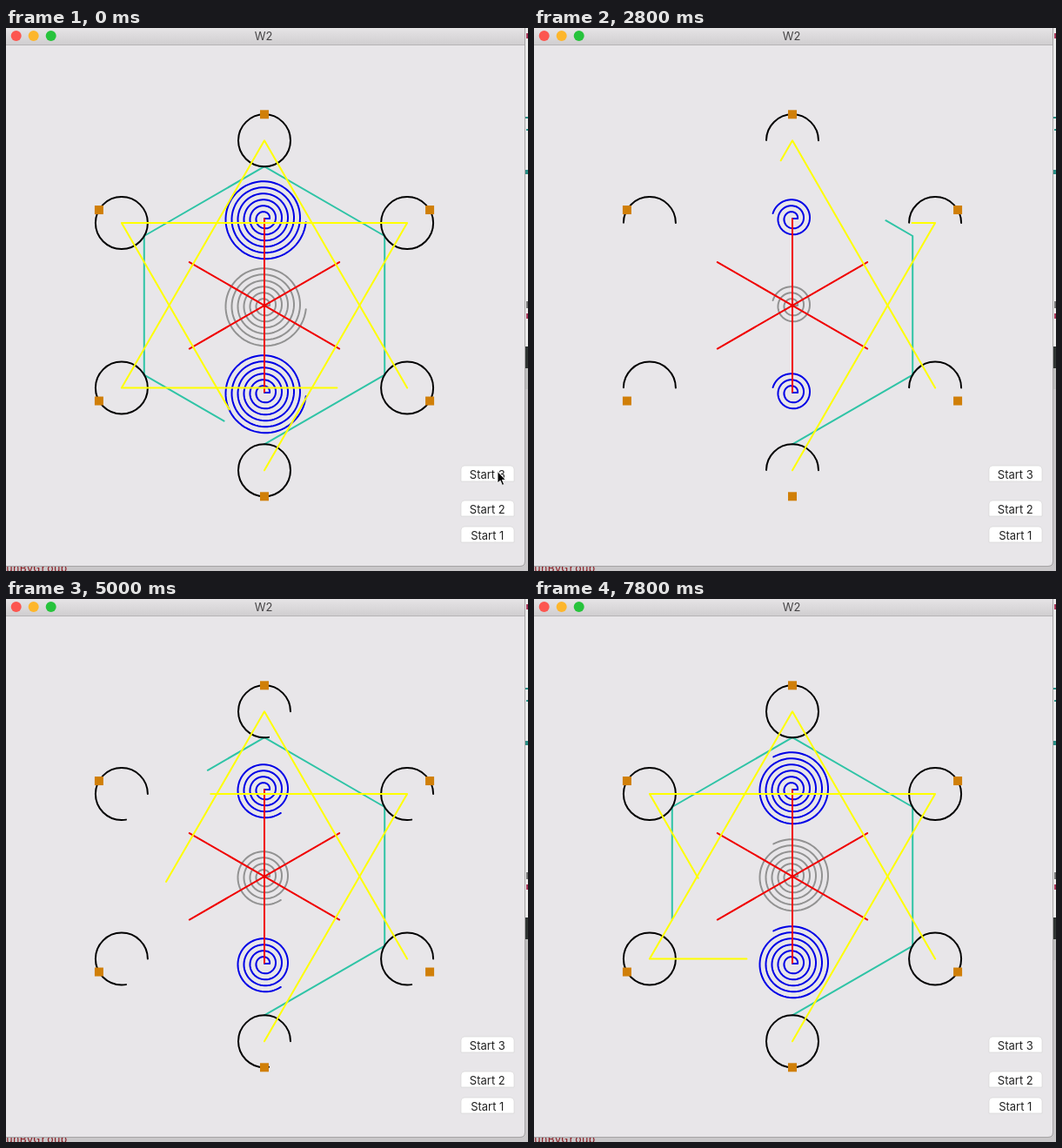
An HTML page for the animation above (8000 ms loop, 600 px wide and 624 px high).

```html
<!DOCTYPE html>
<html lang="en">
<head>
<meta charset="utf-8">
<title>W2</title>
<style>
  html, body { margin: 0; width: 100%; height: 100%; overflow: hidden; background: #c6c4c6; }
  svg { display: block; width: 600px; height: 624px; }
  text { font-family: Inter, Roboto, sans-serif; font-size: 13px; text-anchor: middle; }
  .code { font-family: "DejaVu Sans Mono", monospace; text-anchor: start; }
  #drawing { fill: none; stroke-width: 2; stroke-linecap: round; stroke-linejoin: round; }
</style>
</head>
<body>
<svg viewBox="0 0 600 624">
  <defs>
    <linearGradient id="bar" x2="0" y2="1">
      <stop stop-color="#e6e4e6"/><stop offset="1" stop-color="#cfcdcf"/>
    </linearGradient>
  </defs>

  <!-- desktop behind the window -->
  <rect width="600" height="624" fill="#c9c7c9"/>
  <rect x="596" width="4" height="366" fill="#ececec"/>
  <rect x="596" y="366" width="4" height="25" fill="#2f3432"/>
  <rect x="596" y="391" width="4" height="24" fill="#bdbdbd"/>
  <g fill="#2a8f86">
    <rect x="597" y="102" width="3" height="2"/><rect x="598" y="116" width="2" height="2"/>
    <rect x="597" y="163" width="3" height="5"/>
  </g>
  <g fill="#a8385a">
    <rect x="598" y="6" width="2" height="6"/><rect x="598" y="328" width="2" height="6"/>
  </g>
  <rect x="598" y="314" width="2" height="8" fill="#777"/>
  <text class="code" x="0" y="625" fill="#8c1f26">unByGroup</text>

  <!-- window -->
  <path d="M0 0H596V613Q596 618 591 618H0Z" fill="#e8e6e9"/>
  <path d="M0 618.5H591Q596.5 618.5 596.5 613V0" fill="none" stroke="#a5a3a5"/>
  <rect width="596" height="20" fill="url(#bar)"/>
  <rect y="19" width="596" height="1" fill="#b6b4b6"/>
  <circle cx="11.7" cy="9" r="6" fill="#fc5650"/>
  <circle cx="31.7" cy="9" r="6" fill="#fdb62c"/>
  <circle cx="51.7" cy="9" r="6" fill="#27c33c"/>
  <text x="296" y="14" fill="#454345">W2</text>

  <g id="drawing"></g>
  <g id="buttons"></g>
  <path id="cursor" d="M565 509.5V523L568.2 520.2L570.4 525.4L572.6 524.4L570.4 519.3H574.4Z"
        fill="#000" stroke="#fff" stroke-width=".9"/>
</svg>
<script>
const LOOP = 8000, STEP = 200;
const CX = 297, CY = 318.8;
const BLUE = '#0000e6';
const drawing = document.getElementById('drawing');
const buttons = document.getElementById('buttons');
const cursor = document.getElementById('cursor');

function add(parent, tag, attrs) {
  const el = document.createElementNS('http://www.w3.org/2000/svg', tag);
  for (const name in attrs) el.setAttribute(name, attrs[name]);
  parent.append(el);
  return el;
}

// Corner i of a hexagon, counted counterclockwise from the bottom.
function corner(radius, i) {
  const a = i * Math.PI / 3;
  return [CX + radius * Math.sin(a), CY + radius * Math.cos(a)];
}

const pens = [];

// A path revealed from its start by speed units per turtle step.
function trace(stroke, d, speed, extra = {}) {
  const el = add(drawing, 'path', { d, stroke, ...extra });
  pens.push(n => el.setAttribute('stroke-dasharray', `${n * speed} 9999`));
}

function polygon(stroke, radius, order) {
  trace(stroke, 'M' + order.map(i => corner(radius, i)).join('L'), 2);
}

// Archimedean spiral: 5 degrees per step, 7 px per turn.
function spiral(stroke, cy) {
  const el = add(drawing, 'path', { stroke });
  pens.push(n => {
    let d = `M${CX} ${cy}`;
    for (let i = 0; i <= Math.min(n, 431); i++) {
      const a = i * Math.PI / 36, r = 6 + 7 * i / 72;
      d += `L${(CX + r * Math.cos(a)).toFixed(2)} ${(cy - r * Math.sin(a)).toFixed(2)}`;
    }
    el.setAttribute('d', d);
  });
}

const sides = [0, 1, 2, 3, 4, 5];

spiral('#929292', CY + .2);
spiral(BLUE, CY - 99.8);
spiral(BLUE, CY + 100.2);
for (const i of sides) trace('#f00000', `M${CX} ${CY}L${corner(99.5, i)}`, 1);
polygon('#2fc4a6', 159.6, [...sides, 0]);
for (const i of sides) {
  const [x, y] = corner(189.5, i);
  trace('#000', `M${x + 30} ${y}a30 30 0 1 0 -60 0a30 30 0 1 0 60 0`, 1.01, { pathLength: 360 });
}
polygon('#ffff00', 189.5, [1, 3, 5, 1]);
polygon('#ffff00', 189.5, [0, 2, 4, 0]);
for (const i of sides) {
  const [x, y] = corner(219.5, i);
  add(drawing, 'rect', { x: x - 5, y: y - 5, width: 10, height: 10, fill: '#d07f08' });
}

for (const [label, y] of [['Start 3', 503], ['Start 2', 543], ['Start 1', 573]]) {
  add(buttons, 'path', { d: `M523 ${y + 18}v-14q0 -4 4 -4h53q4 0 4 4v14z`, fill: '#fff', stroke: '#d2d0d2', 'stroke-width': .6 });
  add(buttons, 'text', { x: 553.3, y: y + 14.5, fill: '#222' }).textContent = label;
}

// Turtle steps done at each tick; drawing slows down as the picture fills.
const pace = [[0, 0], [4, 61], [10, 134.5], [18, 217], [25, 277], [32, 328.5], [36.3, 359], [39, 384]];

function slope(i) {
  const a = pace[Math.max(i - 1, 0)], b = pace[Math.min(i + 1, pace.length - 1)];
  return (b[1] - a[1]) / (b[0] - a[0]);
}

function stepsAt(tick) {
  if (tick === 0) return 452;
  const i = pace.findIndex(p => p[0] >= tick) - 1;
  const [k0, n0] = pace[i], [k1, n1] = pace[i + 1];
  const w = k1 - k0, u = (tick - k0) / w, v = 1 - u;
  return n0 * v * v * (1 + 2 * u) + n1 * u * u * (3 - 2 * u)
    + w * u * v * (slope(i) * v - slope(i + 1) * u);
}

let lastTick = -1;
function frame() {
  const t = performance.now() % LOOP;
  const tick = Math.floor(t / STEP);
  if (tick !== lastTick) {
    const n = stepsAt(tick);
    for (const draw of pens) draw(n);
    cursor.style.display = t < 2800 ? '' : 'none';
    lastTick = tick;
  }
  requestAnimationFrame(frame);
}
frame();
</script>
</body>
</html>
```
